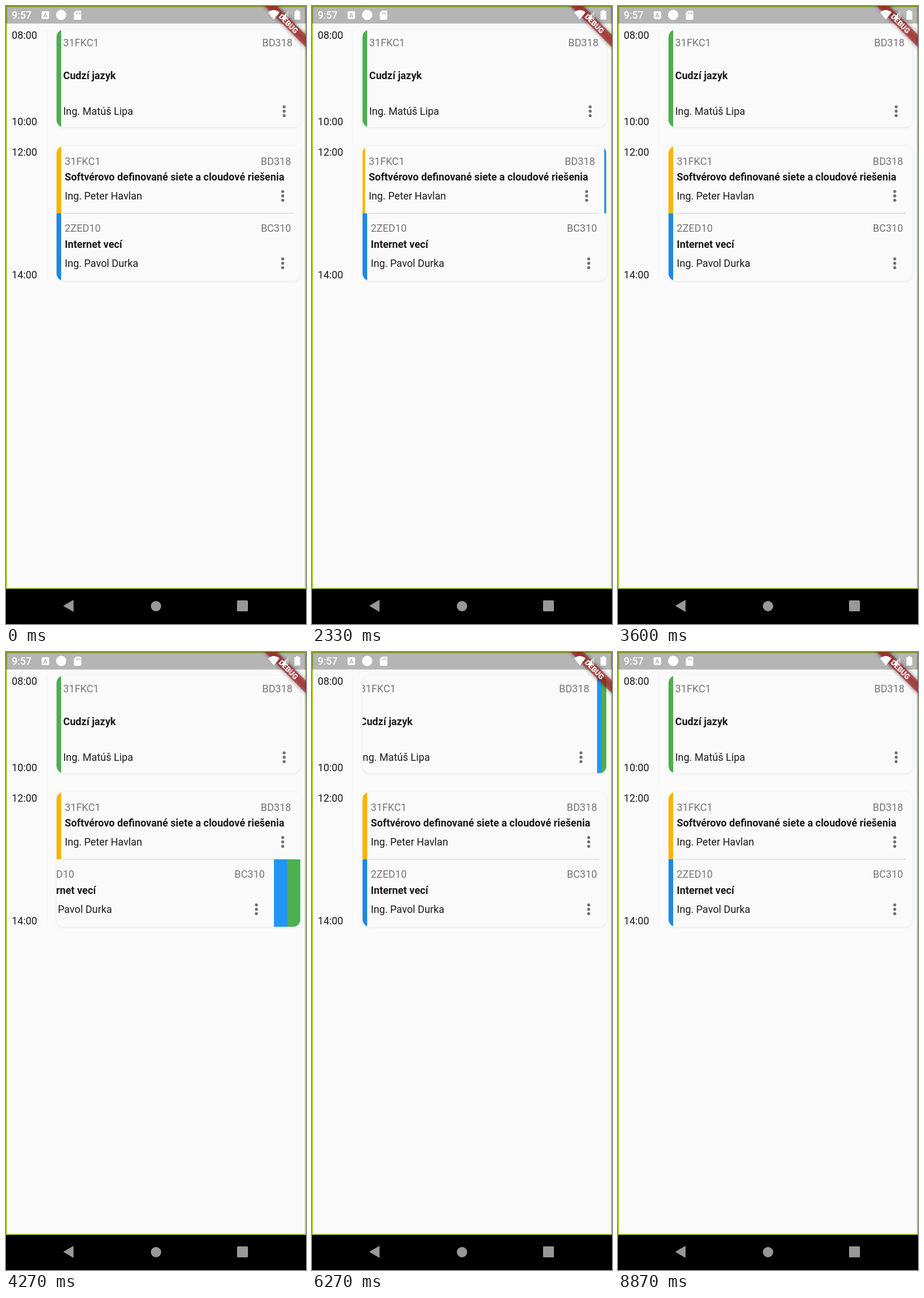
An HTML page that plays this animation: 522 by 1073 pixels, repeating every 8.91 s.

```html
<!DOCTYPE html>
<html lang="sk">
<head>
<meta charset="utf-8">
<style>
html, body { margin: 0; width: 100%; height: 100%; overflow: hidden; background: #000; }
svg { display: block; font: 17.78px Roboto, sans-serif; fill: #1a1a1a; }
.code { fill: #757575; }
.title { font-weight: 700; }
.end { text-anchor: end; }
.card { fill: #fafafa; filter: drop-shadow(0 1px 2px rgba(60, 60, 90, .1)); }
.white { fill: #fff; }
.nav { fill: #989898; }
</style>
</head>
<body>
<svg id="stage" width="522" height="1073" viewBox="0 0 522 1073">
  <defs>
    <clipPath id="single"><rect x="88" y="41" width="424" height="169.5" rx="12.7"/></clipPath>
    <clipPath id="pair"><rect x="88" y="243" width="424" height="234" rx="12.7"/></clipPath>
    <clipPath id="screen"><rect width="522" height="1012"/></clipPath>
    <filter id="blur" x="-20%" y="-60%" width="140%" height="220%"><feGaussianBlur stdDeviation="3.5"/></filter>
    <g id="share" class="white" stroke="#fff" stroke-width="2">
      <path d="M18 5 6 12l12 7" fill="none"/>
      <circle cx="18" cy="5" r="2"/><circle cx="6" cy="12" r="2"/><circle cx="18" cy="19" r="2"/>
    </g>
    <g id="bell" class="white">
      <path d="M12 22c1.1 0 2-.9 2-2h-4c0 1.1.9 2 2 2zm6-6v-5c0-3.1-1.6-5.6-4.5-6.3V4a1.5 1.5 0 0 0-3 0v.7C7.6 5.4 6 7.9 6 11v5l-2 2v1h16v-1z"/>
      <path d="M19.5 3.5v9M15 8h9" stroke="#4caf50" stroke-width="4.6"/>
      <path d="M19.5 4v8M15.5 8h8" stroke="#fff" stroke-width="2"/>
    </g>
  </defs>
  <rect width="522" height="1012" fill="#fafafa"/>
  <path d="M71.5 41V477" stroke="#f4f4f4"/>
  <g id="hours"></g>
  <rect class="card" x="88" y="41" width="424" height="169" rx="12.7"/>
  <rect class="card" x="88" y="243" width="424" height="234" rx="12.7"/>
  <path d="M98 360H500" stroke="#dcdcdc" stroke-width="1.3"/>
  <g id="single-cards" clip-path="url(#single)"></g>
  <g id="pair-cards" clip-path="url(#pair)"></g>

  <rect x="1" y="1" width="520" height="1010" fill="none" stroke="#b4d23c" stroke-width="2"/>
  <rect width="522" height="30.5" fill-opacity=".28" fill="#000"/>
  <g clip-path="url(#screen)">
    <g transform="translate(522 0) rotate(45)">
      <rect x="-50.8" y="35.6" width="101.6" height="15.2" opacity=".5" fill="#000" filter="url(#blur)"/>
      <rect x="-50.8" y="35.6" width="101.6" height="15.2" fill="#b71c1c" fill-opacity=".63"/>
      <text class="white" y="47.8" text-anchor="middle" font-size="12.9" font-weight="900">DEBUG</text>
    </g>
  </g>
  <g class="white">
    <text x="10" y="22" font-size="17.5" font-weight="500">9:57</text>
    <rect x="62" y="9" width="13" height="13.5" rx="2"/>
    <text x="68.5" y="20" text-anchor="middle" font-size="11" font-weight="700" fill="#b4b4b4">A</text>
    <circle cx="96" cy="15.5" r="9"/>
    <path d="M122 8h7q2 0 2 2v12q0 2-2 2h-9q-2 0-2-2V12z"/>
    <path d="M122.5 11v3.5m3-3.5v3.5m3-3.5v3.5" stroke="#b4b4b4" stroke-width="1.4"/>
    <path d="M456 11q10-8 20 0l-10 12.5z"/>
    <path d="M491.5 8v15H478z" fill-opacity=".45"/>
    <path d="M487 13v10h-9z"/>
    <path d="M505 7h4v2h3v14.5h-10V9h3z"/>
  </g>

  <rect y="1012" width="522" height="61" fill="#000"/>
  <g class="nav">
    <path d="M99.5 1041.5 117.5 1031v21z"/>
    <circle cx="261" cy="1042" r="9"/>
    <rect x="402" y="1032" width="19" height="19" rx="1.5"/>
  </g>
</svg>
<script>
const LOOP = 8910, OPEN = 212;
const $ = id => document.getElementById(id);
const text = (x, y, cls, s) => `<text x="${x}" y="${y}" class="${cls}">${s}</text>`;

$('hours').innerHTML = [['08:00', 57], ['10:00', 207], ['12:00', 260], ['14:00', 473]]
  .map(([s, y]) => text(10, y, '', s)).join('');

const cards = [
  { box: 'single-cards', top: 41, height: 169.5, color: '#4caf50', left: 99.5, right: 498.5, rows: [70, 127, 189],
    code: '31FKC1', room: 'BD318', title: 'Cudzí jazyk', teacher: 'Ing. Matúš Lipa' },
  { box: 'pair-cards', top: 243, height: 117, color: '#ffb300', left: 102.3, right: 496, rows: [275.5, 303, 336],
    code: '31FKC1', room: 'BD318', title: 'Softvérovo definované siete a cloudové riešenia', teacher: 'Ing. Peter Havlan' },
  { box: 'pair-cards', top: 360, height: 117, color: '#1e88e5', left: 102.3, right: 496, rows: [392, 420, 453],
    code: '2ZED10', room: 'BC310', title: 'Internet vecí', teacher: 'Ing. Pavol Durka' }
];

function action(card, color, icon) {
  const y = card.top + card.height / 2 - 15.2;
  return `<g><rect y="${card.top}" width="106.5" height="${card.height}" fill="${color}"/>
    <use href="#${icon}" transform="translate(37.8 ${y}) scale(1.27)"/></g>`;
}

for (const c of cards) {
  const dots = [-7.6, 0, 7.6].map(d =>
    `<circle cx="${c.right - 14.5}" cy="${c.rows[2] - 6.3 + d}" r="2.6" fill="#6f6f6f"/>`).join('');
  $(c.box).insertAdjacentHTML('beforeend', `<g>
    <g><rect x="88" y="${c.top}" width="8" height="${c.height}" fill="${c.color}"/>
      ${text(c.left, c.rows[0], 'code', c.code)}${text(c.right, c.rows[0], 'code end', c.room)}
      ${text(c.left, c.rows[1], 'title', c.title)}${text(c.left, c.rows[2], '', c.teacher)}${dots}</g>
    ${action(c, '#2196f3', 'share')}${action(c, '#4caf50', 'bell')}</g>`);
  c.parts = $(c.box).lastElementChild.children;
}

// Swipes: card, start ms, length ms, change of offset
const swipes = [
  [0, 800, 400, OPEN], [0, 1700, 350, -OPEN],
  [1, 2300, 400, OPEN], [1, 3000, 350, -OPEN],
  [2, 4151, 400, OPEN], [2, 4950, 350, -OPEN],
  [0, 5750, 250, 16], [0, 8450, 200, -16]
];

function ease(u) {
  u = Math.min(1, Math.max(0, u));
  return u * u * (3 - 2 * u);
}

function draw(now) {
  const t = now % LOOP, offsets = [0, 0, 0];
  for (const [card, start, length, change] of swipes) offsets[card] += change * ease((t - start) / length);
  cards.forEach(({ parts }, i) => {
    const d = offsets[i];
    [-d, 512 - d, 512 - d / 2].forEach((x, k) => parts[k].setAttribute('transform', `translate(${x} 0)`));
  });
  requestAnimationFrame(draw);
}
draw(performance.now());
</script>
</body>
</html>
```
